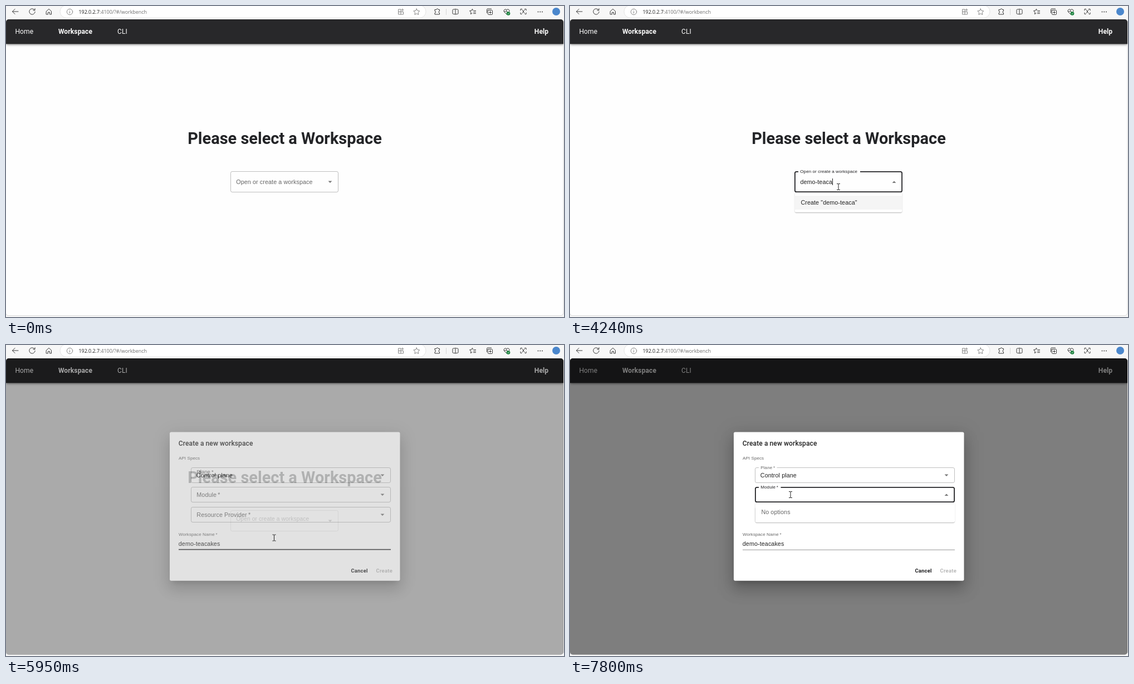
An HTML page for the animation above (8 s loop, 1002x559 px).

```html
<!DOCTYPE html>
<html lang="en">
<head>
<meta charset="utf-8">
<title>Workspace picker</title>
<style>
  html, body { margin: 0; width: 100%; height: 100%; overflow: hidden; background: #f7f7f7; }
  svg { display: block; width: 1002px; height: 559px; }
  text { white-space: pre; }
  .ui { font: 10.72px "Liberation Sans", Arial, sans-serif; letter-spacing: .1px; }
  .small { font-size: 8.04px; letter-spacing: .075px; }
  .nav { font: 12.06px Roboto, sans-serif; letter-spacing: .11px; fill: #fff; }
  .bold { font-weight: 700; }
  .button { font: 700 9.38px Roboto, sans-serif; letter-spacing: .27px; }
  .url { font: 8.9px "Open Sans", "Noto Sans", sans-serif; }
  .icon { fill: none; stroke: #3a3a3a; stroke-width: 1; stroke-linecap: round; stroke-linejoin: round; }
  .pale { stroke: #858585; }
  .line { fill: none; }
</style>
</head>
<body>
<svg viewBox="0 0 1002 559" xmlns="http://www.w3.org/2000/svg">
  <defs>
    <clipPath id="frame"><rect y="24" width="1001" height="532.5" rx="5"/></clipPath>
  </defs>

  <!-- browser bar -->
  <rect width="1002" height="559" fill="#f7f7f7"/>
  <rect x="97" y="-1.5" width="657" height="23" rx="11.5" fill="#fff" stroke="#e4e4e4"/>
  <g class="icon">
    <path d="M22 10H11.5M16 5.5L11.5 10l4.5 4.5"/>
    <path d="M51.6 7.6A5.2 5.2 0 1 0 52.2 10.4M52 4.6v3.2h-3.2"/>
    <path d="M72.5 9.5L77 5.4l4.5 4.1V15h-3v-3.6h-3V15h-3z"/>
    <path d="M771 6.5h2a1.6 1.6 0 0 1 3.2 0h2.3v2.7a1.6 1.6 0 0 0 0 3.2V15H770v-2.6a1.6 1.6 0 0 0 0-3.2V6.5z"/>
    <path d="M806 6h-2.5q-1.500 0-1.500 1.500v5.500q0 1.500 1.500 1.500h2.500M808 6h2.500q1.500 0 1.500 1.500v5.500q0 1.500-1.500 1.500h-2.500M807 5v10.500"/>
    <path d="M837 13l-2.600 1.600.6-3.400-2.500-2.400 3.400-.5 1.500-3 1.500 3M840.500 8.500h3M839.500 11h4M839.500 13.500h4"/>
    <path d="M865.500 7.500h7q1 0 1 1v6q0 1-1 1h-6q-1 0-1-1zM863.500 12.500v-6q0-1.500 1.500-1.500h6.500M869.500 9.500v4M867.500 11.500h4"/>
    <path d="M899 15l-4.600-4.600a2.900 2.900 0 0 1 4.600-3.500a2.900 2.900 0 0 1 4.600 3.500M894.500 10h3l1.200-2 1.500 3.500"/>
    <path d="M924 8V5.500h2.500M931.500 5.500h2.500V8M924 12v2.500h2M934 12v2.500h-2M927 7l4 6M931 7l-4 6"/>
  </g>
  <circle cx="902" cy="13.500" r="3.300" fill="#16803a"/>
  <path d="M900.500 13.500l1.200 1.200 2-2.300" fill="none" stroke="#fff" stroke-width=".8"/>
  <g class="icon pale">
    <circle cx="114.500" cy="10.500" r="5.200"/>
    <path d="M114.500 10v3M114.500 8v.1"/>
    <path d="M705 6h4v9h-4zM705 10.500h8.500V15H709M712 5v4M710 7h4"/>
    <path d="M737.300 5l1.700 3.500 3.800.5-2.800 2.700.7 3.800-3.400-1.800-3.400 1.800.7-3.800-2.800-2.700 3.800-.5z"/>
  </g>
  <path d="M790.500 5v11" stroke="#d5d5d5"/>
  <g fill="#3a3a3a"><circle cx="955.500" cy="10.500" r=".9"/><circle cx="959.200" cy="10.500" r=".9"/><circle cx="962.900" cy="10.500" r=".9"/></g>
  <circle cx="988" cy="10" r="7" fill="#4b87cc"/>
  <text class="url" x="130.500" y="13.700" fill="#1c1c1c">192.0.2.7<tspan fill="#6d6d6d">:4100/?#/workbench</tspan></text>

  <!-- app -->
  <g clip-path="url(#frame)">
    <rect y="24" width="1001" height="533" fill="#fefefe"/>
    <g id="navShadow"></g>
    <rect y="24" width="1001" height="44.300" fill="#28282a"/>
    <text class="nav" x="16.400" y="50.300">Home</text>
    <text class="nav bold" x="93.900" y="50.300">Workspace</text>
    <text class="nav" x="200" y="50.300">CLI</text>
    <text class="nav bold" x="948.800" y="49.800">Help</text>
    <text x="500.500" y="248" text-anchor="middle" fill="#232427" font-family="Roboto, sans-serif" font-weight="700" font-size="28.940">Please select a Workspace</text>
    <g id="picker"></g>
    <g id="menu"></g>
    <rect id="backdrop" y="24" width="1001" height="533"/>
    <g id="dialog">
      <g id="dialogShadow"></g>
      <rect x="294" y="156.500" width="413.500" height="267.300" rx="2.700" fill="#fff"/>
      <text x="309.800" y="181.300" fill="#212121" font-family="Roboto, sans-serif" font-weight="500" font-size="12.060" letter-spacing=".09">Create a new workspace</text>
      <text class="ui small" x="310" y="206.300" fill="#666">API Specs</text>
      <g id="fields"></g>
      <text class="ui small" x="310" y="343" fill="#666">Workspace Name&#8201;*</text>
      <text class="ui" x="309.800" y="361" fill="#212121">demo-teacakes</text>
      <rect id="underline" x="310" width="381"/>
      <text class="button" x="619.400" y="409.300" fill="#1c1c1e">Cancel</text>
      <text class="button" x="664.600" y="409.300" fill="#b8b8b8">Create</text>
      <g id="noOptions"></g>
    </g>
  </g>
  <rect x="-.5" y="24.500" width="1001.500" height="532" rx="5" fill="none" stroke="#000" stroke-opacity=".13"/>

  <!-- pointers -->
  <g id="pointer">
    <path id="arrow" d="M0 0V14.500L3.400 11.400 5.700 16.400 7.900 15.400 5.700 10.600H10z" fill="#fff" stroke="#111" stroke-width=".9"/>
    <path id="beam" d="M-3-5.500h2.300l.7.600.7-.6H3M0-5V5M-3 5.500h2.300l.7-.6.7.6H3" fill="none" stroke="#222"/>
    <path id="hand" d="M-1.300 9V1.200a1.200 1.200 0 0 1 2.400 0V5.500q2.200-.8 2.400.6 2-.5 2.200.8 1.600-.3 1.600 1.200v3.200q0 1.500-1.200 4H-1.500q-.8-2-3-4.500-1-1.600.3-2 1.300-.2 2.900 2" fill="#fff" stroke="#111" stroke-width=".9"/>
  </g>
</svg>

<script>
const LOOP = 8000;
const DARK = '#232326';
const NAME = 'demo-teacakes';
const KEYS = [2320, 2410, 2500, 2650, 2960, 3300, 3430, 3710, 3900, 4240, 4430, 4490, 4710];
const PICK = 5859;      // the option is chosen, the dialog starts to fade in
// stretches of movement: start, end, number of steps
const BURSTS = [[530, 1040, 8], [1200, 1450, 5], [5770, 6140, 7], [6360, 6810, 8], [7280, 7520, 5]];

const $ = id => document.getElementById(id);
const clamp = v => Math.min(1, Math.max(0, v));
const mix = (a, b, k) => a + (b - a) * k;
const within = (t, a, b) => t >= a && t < b;
const show = (node, on) => node.setAttribute('visibility', on ? 'inherit' : 'hidden');

function set(node, attrs) {
  for (const key in attrs) node.setAttribute(key, attrs[key]);
  return node;
}
function add(parent, tag, attrs, text) {
  const node = set(document.createElementNS('http://www.w3.org/2000/svg', tag), attrs);
  if (text) node.textContent = text;
  return parent.appendChild(node);
}

// cubic-bezier(lead, 0, .2, 1)
function ease(x, lead) {
  x = clamp(x);
  let lo = 0, hi = 1;
  for (let i = 0; i < 24; i++) {
    const s = (lo + hi) / 2, r = 1 - s;
    if (3 * lead * r * r * s + .6 * r * s * s + s * s * s < x) lo = s; else hi = s;
  }
  return 3 * lo * lo - 2 * lo * lo * lo;
}
const easeOut = x => ease(x, 0);
const easeInOut = x => ease(x, .4);

function snap(t) {
  for (const [a, b, n] of BURSTS) {
    if (!within(t, a, b)) continue;
    const step = (b - a) / (n - 1);
    return a + Math.floor((t - a + 6) / step) * step;
  }
  return t;
}

// each layer: offset, blur, spread, alpha
function shadow(parent, x, y, w, h, layers) {
  return layers.map(([dy, blur, spread, alpha]) => {
    const node = add(parent, 'rect', {
      x: x - spread, y: y + dy - spread, width: w + 2 * spread, height: h + 2 * spread,
      rx: 2.7, 'fill-opacity': alpha
    });
    node.style.filter = `blur(${blur / 2}px)`;
    return node;
  });
}
const LOW = [[1.3, .7, -.7, .2], [.7, .7, 0, .14], [.7, 2, 0, .12]];

function makeField(parent, x, y, w, h, label, gap) {
  const r = 2.7, n0 = x + 6.5;
  const border = add(parent, 'path', { class: 'line' });
  const arrow = add(parent, 'path', { d: 'M-3.4-1.700H3.400L0 1.700z', fill: '#757575' });
  const caption = add(parent, 'text', { class: 'ui' }, label);
  const hit = (px, py) => px >= x && px <= x + w && py >= y && py <= y + h;

  function update({ shrink = 0, notch = 0, focus = false, hover = false, open = focus }) {
    const i = focus ? .4 : 0;
    const L = x + i, T = y + i, R = x + w - i, B = y + h - i;
    const n1 = n0 + gap * notch;
    set(border, {
      d: `M${n1} ${T}H${R - r}Q${R} ${T} ${R} ${T + r}V${B - r}Q${R} ${B} ${R - r} ${B}` +
         `H${L + r}Q${L} ${B} ${L} ${B - r}V${T + r}Q${L} ${T} ${L + r} ${T}H${n0}`,
      stroke: focus || hover ? DARK : '#000',
      'stroke-opacity': focus || hover ? 1 : .25,
      'stroke-width': focus ? 1.8 : 1
    });
    set(arrow, { transform: `translate(${x + w - 14.5} ${y + h / 2 + .2}) scale(1 ${open ? -1 : 1})` });
    const base = mix(y + h / 2 + 3.8, y + 2.4, shrink);
    set(caption, {
      transform: `translate(${x + 9.8} ${base}) scale(${mix(1, .75, shrink)})`,
      fill: focus ? DARK : '#666'
    });
  }
  return { hit, update };
}

shadow($('navShadow'), 0, 24, 1001, 44.300, [[1.3, 2.7, -.7, .2], [2.7, 3.3, 0, .14], [.7, 6.7, 0, .12]]);
shadow($('dialogShadow'), 294, 156.5, 413.5, 267.3, [[7.4, 10, -4.7, .2], [16, 25.5, 2, .14], [6, 31, 5.4, .12]]);

const picker = makeField($('picker'), 403.5, 297.5, 193, 37, 'Open or create a workspace', 111);
const typed = add($('picker'), 'text', { class: 'ui', x: 413.4, y: 320, fill: '#212121' });
const caret = add($('picker'), 'rect', { y: 310, width: 1, height: 12, fill: '#222' });

const plane = makeField($('fields'), 332.5, 220.5, 358, 27, 'Plane\u2009*', 32.5);
const moduleField = makeField($('fields'), 332.5, 255.5, 358, 27, 'Module\u2009*', 39.5);
const provider = makeField($('fields'), 332.5, 291.5, 358, 27, 'Resource Provider\u2009*', 90);
add($('fields'), 'text', { class: 'ui', x: 341.8, y: 237.6, fill: '#212121' }, 'Control plane');
const moduleCaret = add($('fields'), 'rect', { x: 342, y: 263, width: 1, height: 13, fill: '#222' });

shadow($('noOptions'), 332.5, 283, 358.5, 36, LOW);
add($('noOptions'), 'rect', { x: 332.5, y: 283, width: 358.5, height: 36, rx: 2.7, fill: '#fff' });
add($('noOptions'), 'text', { class: 'ui', x: 343.4, y: 304.2, fill: '#666' }, 'No options');

const menu = $('menu');
const sheets = [...shadow(menu, 403.5, 335, 193, 36, LOW),
  add(menu, 'rect', { x: 403.5, y: 335, width: 193, height: 36, rx: 2.7, fill: '#fff' })];
const sheetHeights = sheets.map(s => +s.getAttribute('height'));
add(menu, 'rect', { x: 403.5, y: 341, width: 193, height: 25, fill: '#f5f5f5' });
const options = [357, 382].map(y => add(menu, 'text', { class: 'ui', x: 414.4, y, fill: '#212121' }));

function pointerAt(t) {
  if (t < 1040) {
    const k = easeInOut(mix(.12, 1, (t - 530) / 510));
    return [mix(870, 482, k), mix(488, 325, k)];
  }
  if (t < 5430) return [482, 325];
  const u = easeInOut((t - 6300) / 510), v = 1 - u;
  const arc = (a, b, c) => v * v * a + 2 * u * v * b + u * u * c;
  return [arc(481.5, 400, 396), arc(346.5, 170, 269)];
}

function drawPicker(t, x, y) {
  const chosen = t >= PICK;
  const focus = t >= 1200 && !chosen;
  const count = chosen ? 0 : KEYS.filter(k => t >= k).length;
  const word = NAME.slice(0, count);
  picker.update({
    shrink: chosen ? 1 - easeOut((t - PICK) / 200) : easeOut((t - 1226) / 200),
    notch: chosen ? +(t < PICK + 45) : easeOut((t - 1276) / 100),
    hover: within(t, 530, PICK) && picker.hit(x, y),
    focus
  });
  typed.textContent = word;
  set(caret, { x: Math.round(413 + (count ? typed.getComputedTextLength() : 0)) });
  show(caret, within(t, 1260, 1790) || within(t, 2320, 5240) || within(t, 5770, PICK));

  const list = [];
  if (count < 6) list.push('demo-pancake');
  if (count) list.push(`Create "${word}"`);
  show(menu, focus);
  options.forEach((o, i) => { o.textContent = list[i] || ''; });
  sheets.forEach((s, i) => set(s, { height: sheetHeights[i] + 25 * (list.length - 1) }));
}

function drawDialog(t, x, y) {
  const fade = easeInOut((t - PICK) / 225);
  const open = t >= 7275;
  const ready = t >= PICK;
  set($('backdrop'), { 'fill-opacity': fade / 2 });
  set($('dialog'), { opacity: fade });
  show($('dialog'), ready);
  plane.update({
    shrink: easeOut((t - 5919) / 200), notch: easeOut((t - 5969) / 100), hover: plane.hit(x, y)
  });
  moduleField.update({
    shrink: easeOut((t - 7300) / 200), notch: easeOut((t - 7350) / 100),
    hover: moduleField.hit(x, y), focus: open
  });
  provider.update({ hover: provider.hit(x, y) });
  show(moduleCaret, within(t, 7300, 7800));
  show($('noOptions'), open);

  const over = overName(x, y);
  set($('underline'), { y: over ? 366.8 : 367.7, height: over ? 1.6 : 1, fill: over ? DARK : '#949494' });
}

const overName = (x, y) => x >= 310 && x <= 691 && y >= 345 && y <= 369;

function drawPointer(t, x, y) {
  const hand = within(t, 5430, PICK);
  const targets = t < PICK ? [picker] : [plane, moduleField, provider];
  const beam = !hand && (targets.some(f => f.hit(x, y)) || (t >= PICK && overName(x, y)));
  set($('pointer'), { transform: `translate(${x} ${y})` });
  show($('pointer'), t >= 530);
  show($('hand'), hand);
  show($('beam'), beam);
  show($('arrow'), !hand && !beam);
}

function draw(time) {
  const t = snap(time);
  const [x, y] = pointerAt(t);
  drawPicker(t, x, y);
  drawDialog(t, x, y);
  drawPointer(t, x, y);
}

const start = performance.now();
function tick() {
  draw((performance.now() - start) % LOOP);
  requestAnimationFrame(tick);
}
tick();
</script>
</body>
</html>
```
